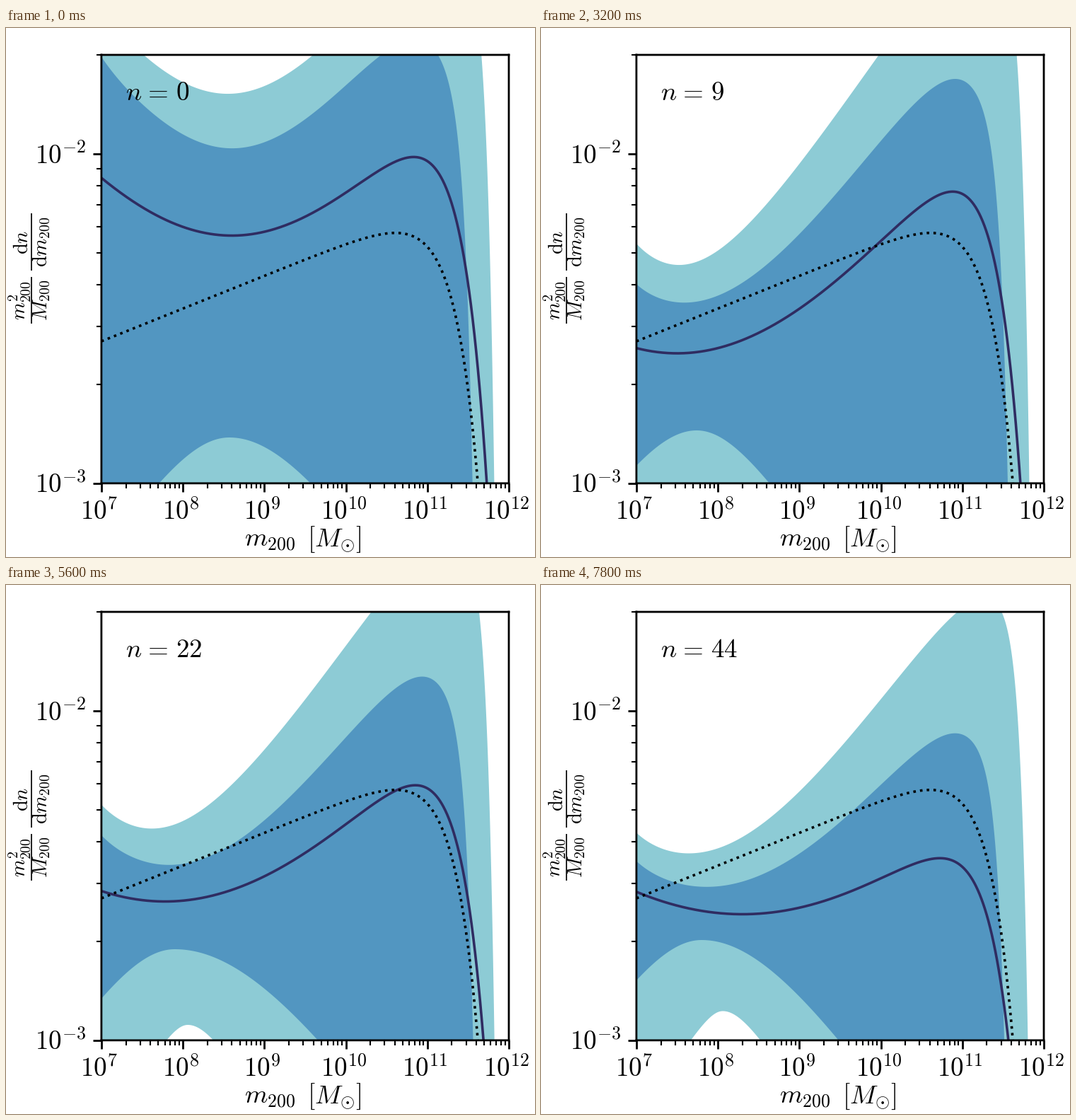
Animation of 748 by 748 pixels, one loop 8 s. Source, as a matplotlib script:

```python
import numpy as np
import matplotlib.pyplot as plt
from matplotlib.animation import FuncAnimation

SIZE, DPI = 748, 100
PT = 72 / DPI                      # points per pixel
LEFT, RIGHT, TOP, BOTTOM = 134.9, 711, 38, 643.8
DECADE_X, DECADE_Y = 115.2, 465.7
TEAL, BLUE, NAVY = "#8dcbd5", "#5296c1", "#2f2c61"

plt.rcParams["mathtext.fontset"] = "cm"
plt.rcParams["path.snap"] = False

SLOPE = 180                        # far slope of every arc, px per decade
U = np.linspace(0, 5, 700)         # decades from the left edge
X = LEFT + DECADE_X * U

# Turning points of the curves at a few rounds: decades, then pixel heights.
ROUNDS = [1, 9, 16, 22, 30, 44]
MEDIAN = ([1.6, 0.5, 0.97, 0.78, 0.35, 1.3],
          [293.5, 460, 443, 447.5, 442, 465.5])
INNER = ([1.6, 0.56, 0.82, 0.82, 0.62, 0.85],
         [170, 389, 384, 396, 380, 427])
OUTER = ([1.55, 0.5, 0.62, 0.6, 0.5, 0.62],
         [93, 336, 335, 345, 336, 380])
INNER_CREST = ([1.57, 0.74, 0.63, 0.9, 0.9, 0.8],
               [579, 569, 517, 515, 511, 502])
CREST_WIDTH = [1.2, 0.75, 0.85, 1.8, 3, 1.4]
OUTER_CREST = [690, 690, 637, 622, 601, 602.5]


def at(n, values):
    return np.interp(n, ROUNDS, values)


def arc(u, centre, width):
    """Hyperbola: round at the centre, straight further out."""
    return SLOPE * (np.hypot(u - centre, width) - width)


def hill(n, valley, width, feet, share, slow, lift=0):
    """Valley and rise, then a slow and a fast exponential drop to the foot."""
    centre, low = (at(n, v) for v in valley)
    foot = np.interp(n, [0, 30, 44], feet)
    base = low - arc(U, centre, width) - lift * 10 ** (-2 * U)
    fall = BOTTOM - low + arc(foot, centre, width)
    drop = (share * 10 ** (slow * (U - foot))
            + (1 - share) * 10 ** (5 * (U - foot)))
    return np.minimum(base + fall * drop, BOTTOM + 60)


def median_line(n):
    return hill(n, MEDIAN, 2.6 + 0.048 * n, [4.73, 4.675, 4.566], 1, 1.35)


def inner_top(n):
    return hill(n, INNER, 1.6 + 0.0004 * n * n, [4.555, 4.565, 4.515],
                0.45, 1.15, 10)


def outer_top(n):
    width = 0.82 + 0.02 * n + 0.8 * np.exp(-(n / 4) ** 2)
    return hill(n, OUTER, width, [4.822, 4.825, 4.805], 0.3, 1.15, 10)


def crest(centre, high, left, right):
    width = np.where(U < centre, left, right)
    return np.minimum(high + arc(U, centre, width), BOTTOM + 60)


def inner_low(n):
    centre, high = (at(n, v) for v in INNER_CREST)
    return crest(centre, high, 0.85, at(n, CREST_WIDTH))


def outer_low(n):
    return crest(1.06, at(n, OUTER_CREST), 0.22, 0.35)


def close(y):
    """Area between a curve and a floor below the plot."""
    floor = BOTTOM + 80
    return np.vstack([[X[0], floor], np.column_stack([X, y]), [X[-1], floor]])


fig = plt.figure(figsize=(SIZE / DPI, SIZE / DPI), dpi=DPI, facecolor="white")
ax = fig.add_axes([LEFT / SIZE, 1 - BOTTOM / SIZE,
                   (RIGHT - LEFT) / SIZE, (BOTTOM - TOP) / SIZE])
ax.set(xlim=(LEFT, RIGHT), ylim=(BOTTOM, TOP), autoscale_on=False)


def label(x, y, tex, size=37, **kw):
    return ax.text(x, y, f"${tex}$", fontsize=size * PT, color="black",
                   va="baseline", zorder=5, **kw)


# Logarithmic axes
digits = np.log10(np.arange(2, 10))
ax.set_xticks([LEFT + DECADE_X * k for k in range(6)])
ax.set_xticks([LEFT + DECADE_X * (k + d) for k in range(5) for d in digits],
              minor=True)
ax.set_yticks([BOTTOM, BOTTOM - DECADE_Y])
ax.set_yticks([BOTTOM - DECADE_Y * d for d in digits] + [TOP], minor=True)
for which, length, width in [("major", 12.2, 2.8), ("minor", 7, 2.1)]:
    ax.tick_params(which=which, length=length * PT, width=width * PT,
                   labelbottom=False, labelleft=False)
for spine in ax.spines.values():
    spine.set_linewidth(2.8 * PT)

for k in range(6):
    shift = 29.5 if k < 3 else 36
    label(LEFT + DECADE_X * k - shift, 695, f"10^{{{k + 7}}}")
label(41, 191, "10^{-2}")
label(41, 656.5, "10^{-3}")
label(337, 733, "m_{200}")
label(425.5, 733, r"[M_{\odot}]")

# Vertical axis title: two fractions
for x, y, tex in [(28, 385, "m_{200}^2"), (58.5, 385, "M_{200}"),
                  (31, 302.5, r"\mathrm{d}n"),
                  (58.5, 302.5, r"\mathrm{d}m_{200}")]:
    label(x, y, tex, 28.5, rotation=90, rotation_mode="anchor", ha="center")
for y0, y1 in [(352, 418), (262, 343)]:
    ax.plot([36, 36], [y0, y1], color="black", lw=1.7 * PT, clip_on=False,
            solid_capstyle="butt")

# Bands, painted from back to front
layers = [(outer_top, TEAL), (inner_top, BLUE),
          (inner_low, TEAL), (outer_low, "white")]
bands = [ax.fill([0, 1, 1], [0, 0, 1], color=c, lw=0, zorder=1 + 0.1 * i)[0]
         for i, (_, c) in enumerate(layers)]
median, = ax.plot([], [], color=NAVY, lw=3.6 * PT, zorder=2)
ax.plot(X, 443 - 46.3 * U + 13.5 * 10 ** (1.46 * (U - 3.602)),
        color="black", lw=3.6 * PT, ls=":", zorder=2.1)

label(169, 102, "n")
label(193.6, 102, "=")
counter = label(239.5, 102, "0")


def round_at(i):
    """Hold the first round, then step by one and later by two."""
    if i < 8:
        return 0
    return i - 7 if i < 28 else 2 * i - 34


def draw(i):
    n = round_at(i)
    for band, (curve, _) in zip(bands, layers):
        band.set_xy(close(curve(n)))
    median.set_data(X, median_line(n))
    counter.set_text(f"${n}$")
    return [*bands, median, counter]


anim = FuncAnimation(fig, draw, frames=40, interval=200, repeat=True,
                     repeat_delay=0)
plt.show()
```
